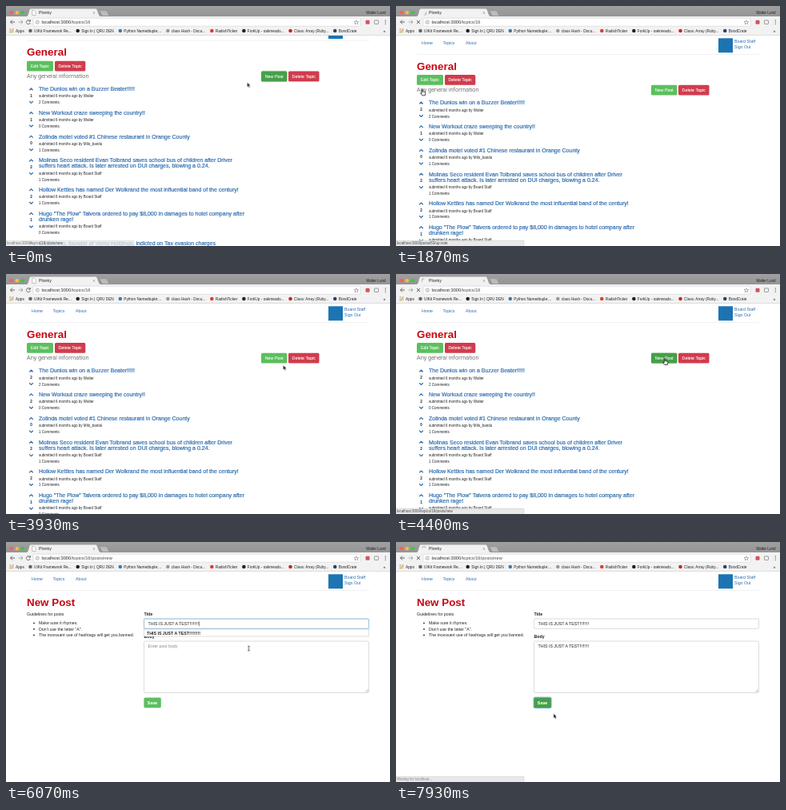
These frames come from a looping animation (480x300 px, 8000 ms). An HTML page:

```html
<!DOCTYPE html>
<html lang="en">
<head>
<meta charset="utf-8">
<title>Forum demo</title>
<style>
html, body { margin: 0; width: 100%; height: 100%; overflow: hidden; background: #fff; }
svg { display: block; width: 480px; height: 300px; font: 5.25px "Liberation Sans", Arial, sans-serif; fill: #222; }
text { white-space: pre; }
.link { fill: #2d6cae; }
.title { font-size: 7px; stroke: #2d6cae; stroke-width: .2px; }
.small { font-size: 4.55px; }
.h1 { font-size: 13.4px; font-weight: bold; fill: #c70512; }
.lead { font: 300 7.45px Roboto, "Liberation Sans", sans-serif; fill: #333; }
.bold { font-weight: bold; }
.mark { font-size: 4.75px; }
.url { font-size: 5.7px; }
.dim { fill: #4a4a4a; }
.btn { font-size: 5.35px; fill: #fff; stroke: #fff; stroke-width: .08px; }
.hint { fill: #888; }
.status { font-size: 4.5px; fill: #444; }
.line { fill: none; stroke: #666; stroke-width: 1; }
.thin { stroke-width: .5; }
.chevron { stroke: #2d6cae; stroke-width: 1.2; }
.field { fill: #fff; stroke: #c4c4c4; stroke-width: .6; }
.glow { fill: none; stroke: #8cc0e4; stroke-width: .6; }
.halo { fill: none; stroke: #8cc0e4; stroke-width: 2; opacity: .2; }
#spin { stroke: #8a8a8a; stroke-width: .8; animation: turn calc(8s / 11) linear -55ms infinite; }
@keyframes turn { to { transform: rotate(-360deg); } }
</style>
</head>
<body>
<svg id="stage" viewBox="0 0 480 300"></svg>
<script>
const LOOP = 8000;
const stage = document.getElementById('stage');
const text = (x, y, s, cls = '', more = '') => `<text x="${x}" y="${y}" class="${cls}" ${more}>${s}</text>`;
const rect = (x, y, w, h, fill, r = 0, more = '') =>
  `<rect x="${x}" y="${y}" width="${w}" height="${h}" rx="${r}" fill="${fill}" ${more}/>`;
const dot = (x, y, r, fill) => `<circle cx="${x}" cy="${y}" r="${r}" fill="${fill}"/>`;
const line = (d, cls = '', more = '') => `<path class="line ${cls}" d="${d}" ${more}/>`;
const cross = (x, y, r, cls) => line(`M${x - r} ${y - r}l${2 * r} ${2 * r}m0 ${-2 * r}l${-2 * r} ${2 * r}`, cls);
const group = (id, ...parts) => `<g id="${id}">${parts.join('')}</g>`;

const GREEN = '#5cbf5f', DARK = '#45a049', RED = '#d03c4d';
const button = (x, y, w, label, fill, hoverId = '', cls = '') =>
  rect(x, y, w, 12.8, fill, 1.5) +
  (hoverId && rect(x, y, w, 12.8, DARK, 1.5, `id="${hoverId}"`)) +
  text(x + w / 2, y + 8.3, label, 'btn ' + cls, 'text-anchor="middle"');

// Browser frame
const bookmarks = {
  'UIKit Framework Re...': '#666', 'Sign In | QRU DEN': '#222', 'Python Namedtuple:...': '#4079ad',
  'class Hash - Docu...': '#999', 'RadishTicker': '#d8402c', 'ForkUp - oakmeads...': '#222',
  'Class: Array (Ruby...': '#c5252c', 'BondCrate': '#24456f',
};
const lights = ['#fb5e58', '#fcbc3e', '#34c84a'];
const appDots = Array.from({ length: 9 }, (_, i) =>
  rect(4.5 + i % 3 * 1.8, 28.4 + (i / 3 | 0) * 1.8, 1.2, 1.2, lights[(i + (i / 3 | 0)) % 3])).join('');

const frame = () => `
  <linearGradient id="bar" x2="0" y2="1"><stop stop-color="#a0a0a0"/><stop offset="1" stop-color="#949494"/></linearGradient>
  ${rect(0, 0, 480, 13.5, 'url(#bar)')}
  ${lights.map((c, i) => dot(6.8 + i * 7, 8.3, 2.3, c)).join('')}
  ${rect(0, 13, 480, 24, '#f2f2f2')}
  <path d="M25 13.5Q27.4 13 28.5 8.5Q29.5 3.4 31 3.4H112Q113.6 3.4 115 8.5Q116.4 13 119 13.5Z" fill="#f2f2f2"/>
  <path d="M117.5 6.3H125.5L128.5 12H120.5Z" fill="#bcbcbc"/>
  ${cross(109.9, 8.5, 1.2, 'thin')}
  ${text(41, 10.3, 'Plonky')}
  ${text(474.5, 9.8, 'Walter Lund', 'small', 'text-anchor="end"')}
  ${line('M11 20H5.5M8 17.5L5.5 20L8 22.5')}
  ${line('M15.5 20H21M18.5 17.5L21 20L18.5 22.5', '', 'opacity=".5"')}
  ${rect(34, 15.2, 409, 10, '#fff', 1.3, 'stroke="#c8c8c8" stroke-width=".5"')}
  <circle cx="39.3" cy="20.2" r="2.1" class="line thin"/>
  ${line('M39.3 19.8V21.4M39.3 18.8V19.3', 'thin')}
  ${text(44.5, 22.2, 'localhost:3000<tspan class="dim">/topics/16<tspan id="urlNew">/posts/new</tspan></tspan>', 'url')}
  ${line('M438 17.6L438.8 19.5L440.8 19.6L439.2 20.9L439.8 22.8L438 21.7L436.2 22.8L436.8 20.9L435.2 19.6L437.2 19.5Z', 'thin')}
  ${rect(449.5, 17.8, 5, 5, '#d2535c', 1)}
  ${rect(460.5, 17.9, 5, 4.6, 'none', .6, 'stroke="#777" stroke-width=".7"')}
  ${[0, 1, 2].map(i => dot(474.3, 18 + i * 2.2, .65, '#666')).join('')}
  ${appDots}${text(12, 32.8, 'Apps', 'mark')}${text(471.5, 32.6, '»')}
  ${Object.entries(bookmarks).map(([s, c]) => `<g class="bookmark">${dot(.5, 31, 2.3, c)}${text(5, 32.8, s, 'mark')}</g>`).join('')}
  ${rect(0, 36.4, 480, .6, '#cfcfcf')}
  ${group('idle',
    '<path d="M32.8 5.3H35.6L37.2 7V11.6H32.8Z" fill="#fff" stroke="#888" stroke-width=".5"/>',
    line('M30 18.7A2.5 2.5 0 1 0 30.3 21M30.4 17.2V19.2H28.4'))}
  ${group('busy',
    `<g transform="translate(35 8.6)">${line('M-2.6 -1A2.8 2.8 0 0 1 2.3 -1.6', '', 'id="spin"')}</g>`,
    cross(28, 20.1, 2.1))}`;

const nav = text(32, 48, 'Home', 'link') + text(58.6, 48, 'Topics', 'link') + text(87, 48, 'About', 'link') +
  rect(403, 40.3, 18, 18, '#1d74b3') +
  text(423, 45.8, 'Board Staff', 'link') + text(423, 53.2, 'Sign Out', 'link') +
  rect(26, 60, 428, .5, '#e2e2e2');
const heading = s => text(26, 79.7, s, 'h1');

// Topic page: votes, author, comments, title lines
const posts = [
  [1, 'Walter', 2, 'The Dunlos win on a Buzzer Beater!!!!!'],
  [1, 'Walter', 0, 'New Workout craze sweeping the country!!'],
  [0, 'Milo_bandu', 1, 'Zolinda motel voted #1 Chinese restaurant in Orange County'],
  [2, 'Board Staff', 1, 'Molinas Seco resident Evan Tolbrand saves school bus of children after Driver',
    'suffers heart attack. Is later arrested on DUI charges, blowing a 0.24.'],
  [2, 'Board Staff', 1, 'Hollow Kettles has named Der Wolkrand the most influential band of the century!'],
  [1, 'Board Staff', 0, 'Hugo "The Plow" Talvera ordered to pay $8,000 in damages to hotel company after',
    'drunken rage!'],
  [1, 'Board Staff', 0, 'Gil Brenno, founder of Vemo Holdings, indicted on Tax evasion charges'],
];
const LEADING = 7.1;
const score = (n, id) => text(31.5, 10, n, 'small bold', `text-anchor="middle" id="${id}"`);
const chevron = (y, k) => line(`M29.2 ${y + k}L31.5 ${y - k}L33.8 ${y + k}`, 'chevron');
let top_ = 121;
const post = ([votes, author, comments, ...lines], i) => {
  const extra = (lines.length - 1) * LEADING;
  const y = top_;
  top_ += 29.7 + extra;
  return `<g transform="translate(0 ${y})">` +
    chevron(.3, 1.1) + chevron(16.4, -1.1) +
    score(votes, 'old' + i) + (i < 2 ? score(votes + 1, 'new' + i) : '') +
    lines.map((s, k) => text(41, 2.4 + k * LEADING, s, 'link title')).join('') +
    text(41, 10.7 + extra, `submitted 6 months ago by ${author}`, 'small') +
    text(41, 18.6 + extra, `${comments} Comments`, 'small') + '</g>';
};
const topicPage = () => group('topic', group('scroll', nav, heading('General'),
  button(26, 86, 33, 'Edit Topic', GREEN), button(61, 86, 38.3, 'Delete Topic', RED),
  text(26, 107, 'Any general information', 'lead'),
  button(319, 98.8, 32.3, 'New Post', GREEN, 'postHover'), button(353, 98.8, 38.5, 'Delete Topic', RED),
  posts.map(post).join('')));

// New post form
const MSG = 'THIS IS JUST A TEST!!!!!!!!';
const rules = ['Make sure it rhymes.', 'Don\'t use the letter "A".', 'The incessant use of hashtags will get you banned.'];
const box = (y, h, cls) => `<rect x="172.5" y="${y}" width="281" height="${h}" rx="1.5" class="${cls}"/>`;
const field = (name, y, h) => box(y, h, 'field') + group(name + 'Focus', box(y, h, 'halo'), box(y, h, 'glow')) +
  text(177.5, y + 7.9, 'Enter post ' + name, 'hint', `id="${name}Hint"`) +
  text(177.5, y + 7.9, MSG, '', `id="${name}Text"`);
const formPage = () => group('form', nav, heading('New Post'),
  text(26, 92.2, 'Guidelines for posts'),
  rules.map((s, i) => dot(35, 101.4 + i * 7.5, .9, '#222') + text(41, 103.3 + i * 7.5, s)).join(''),
  text(172.5, 92.2, 'Title', 'bold'), text(172.5, 119.7, 'Body', 'bold'),
  field('title', 96, 12.3), field('body', 124, 64.5),
  rect(177.3, 99.2, .5, 6, '#222', 0, 'id="caret"'), rect(241.6, 99.2, .5, 6, '#222', 0, 'id="caretEnd"'),
  line('M449.5 187.5L452.6 184.4M451.4 187.5L452.6 186.3', 'thin'),
  group('suggest', rect(172.6, 109, 280.8, 9, '#fff', 0, 'stroke="#bbb" stroke-width=".5"'), text(176, 115.6, MSG, 'bold')),
  button(172.4, 194.4, 21.4, 'Save', GREEN, 'saveHover', 'bold'),
  group('saveFocus', rect(172.1, 194.1, 22, 13.4, 'none', 1.5, 'stroke="#5b9bd0" stroke-width=".8"')));

const status = (id, s, more = '') => group(id,
  rect(-1, 293.2, 161, 8, '#e8e8e8', 1, 'stroke="#c4c4c4" stroke-width=".5"'),
  text(1, 298.3, s, 'status', more));

const pointer = group('cursor',
  '<path id="arrow" d="M0 0V5.9L1.4 4.6L2.4 6.7L3.3 6.2L2.4 4.3H4.2Z" fill="#111" stroke="#fff" stroke-width=".4"/>',
  '<path id="hand" d="M-.7 .3Q0 -.5 .6 .3V2.6L3.3 3.2Q4 3.5 3.9 4.6L3.3 7.4H-.4L-2.4 4.6Q-2.4 3.6 -.7 4.6Z" fill="#fff" stroke="#111" stroke-width=".8"/>',
  line('M-1.2 -3Q0 -3 0 -2.2Q0 -3 1.2 -3M0 -2.2V2.4M-1.2 3.1Q0 3.1 0 2.3Q0 3.1 1.2 3.1', '', 'id="beam" style="stroke:#111;stroke-width:.7"'));

stage.innerHTML = rect(0, 0, 480, 300, '#fff') + topicPage() + formPage() + frame() +
  status('statusLeft', 'localhost:3000/topics/16/posts/new') +
  status('statusNew', 'localhost:3000/topics/16/posts/new') +
  status('statusFirst', 'localhost:3000/posts/63/up-vote') +
  status('statusSecond', 'localhost:3000/posts/62/up-vote') +
  status('statusWait', 'Waiting for localhost...', 'opacity=".6"') + pointer;

// Bookmarks sit side by side, each as wide as its label
let left = 30;
for (const mark of stage.querySelectorAll('.bookmark')) {
  mark.setAttribute('transform', `translate(${left} 0)`);
  left += 12.5 + mark.lastChild.getComputedTextLength();
}

// Timeline in ms, written out as CSS keyframes
let css = '';
const track = (id, prop, keys, ease = 'linear') => {
  const steps = [[0, keys[0][1]], ...keys, [LOOP, keys.at(-1)[1]]]
    .filter(([t]) => t <= LOOP)
    .map(([t, v]) => `${t / LOOP * 100}%{${prop}:${v}}`).join('');
  css += `@keyframes k-${id}{${steps}}#${id}{animation:k-${id} ${LOOP}ms ${ease} infinite}`;
};
const show = (id, ...spans) =>
  track(id, 'opacity', [[0, 0], ...spans.flatMap(([from, to]) => [[from, 1], [to, 0]])], 'step-end');
const swap = (before, after, at) => { show(before, [0, at]); show(after, [at, LOOP]); };
const pulse = (id, from, to, ms = 130) =>
  track(id, 'opacity', [[from, 0], [from + ms, 1], [to, 1], [to + ms, 0]]);
const at = (x, y) => `translate(${x}px,${y}px)`;

const click = { first: 930, second: 2730, post: 4270, save: 6670 };
const loaded = { first: 1800, second: 3130, post: 4530, save: LOOP };

// Cursor legs: shape on arrival, start, end, place
const legs = [
  ['hand', 70, 800, at(33, 104.3)],
  ['hand', 2230, 2530, at(31.5, 152.2)],
  ['arrow', 3270, 3800, at(346.5, 114)],
  ['hand', 3930, 4130, at(336, 106)],
  ['beam', loaded.post, 4660, at(317, 108)],
  ['beam', 4730, 4930, at(314, 107.5)],
  ['beam', 5900, 6060, at(303.5, 133)],
  ['hand', 6200, 6470, at(184, 202)],
  ['arrow', 7600, 7920, at(197, 214.5)],
];
const path = [], spans = { arrow: [], hand: [], beam: [] };
let place = at(301.5, 95.5), shape = 'arrow', since = 0;
for (const [next, from, to, goal] of legs) {
  const turn = next === 'arrow' ? from : to;
  path.push([from, place], [to, goal]);
  spans[shape].push([since, turn]);
  [place, shape, since] = [goal, next, turn];
}
spans[shape].push([since, LOOP]);
track('cursor', 'transform', path, 'ease-in-out');
for (const s in spans) show(s, ...spans[s]);

// Page loads
const busy = Object.keys(click).map(k => [click[k], Math.min(loaded[k] + 150, LOOP)]);
show('busy', ...busy);
show('idle', ...busy.map(([from], i) => [i ? busy[i - 1][1] : 0, from]));
swap('topic', 'form', loaded.post);
show('urlNew', [loaded.post, LOOP]);
track('scroll', 'transform', [[0, at(0, -17.2)], [loaded.first, at(0, 0)]], 'step-end');
swap('old0', 'new0', loaded.first);
swap('old1', 'new1', loaded.second);

// Hovering
show('postHover', [0, 70], [4130, loaded.post]);
show('saveHover', [6470, LOOP]);
track('statusLeft', 'opacity', [[0, .75], [220, 0]]);
pulse('statusFirst', 740, loaded.first + 70);
pulse('statusSecond', 2450, 3330);
pulse('statusNew', 4030, 4730);
pulse('statusWait', 7800, LOOP);

// Filling in the form
const typing = 5930, leave = 6130, paste = 6330;
pulse('titleFocus', 5070, leave);
pulse('bodyFocus', leave, click.save);
show('caret', [5060, 5530]);
show('caretEnd', [6060, leave]);
show('titleHint', [0, typing]);
track('titleText', 'clip-path', [[typing, 'inset(-2px 100% -2px 0)'], [6060, 'inset(-2px 0% -2px 0)']], `steps(${MSG.length})`);
show('suggest', [typing, leave]);
swap('bodyHint', 'bodyText', paste);
show('saveFocus', [click.save, LOOP]);

const sheet = document.createElement('style');
sheet.textContent = css;
document.head.append(sheet);
</script>
</body>
</html>
```
